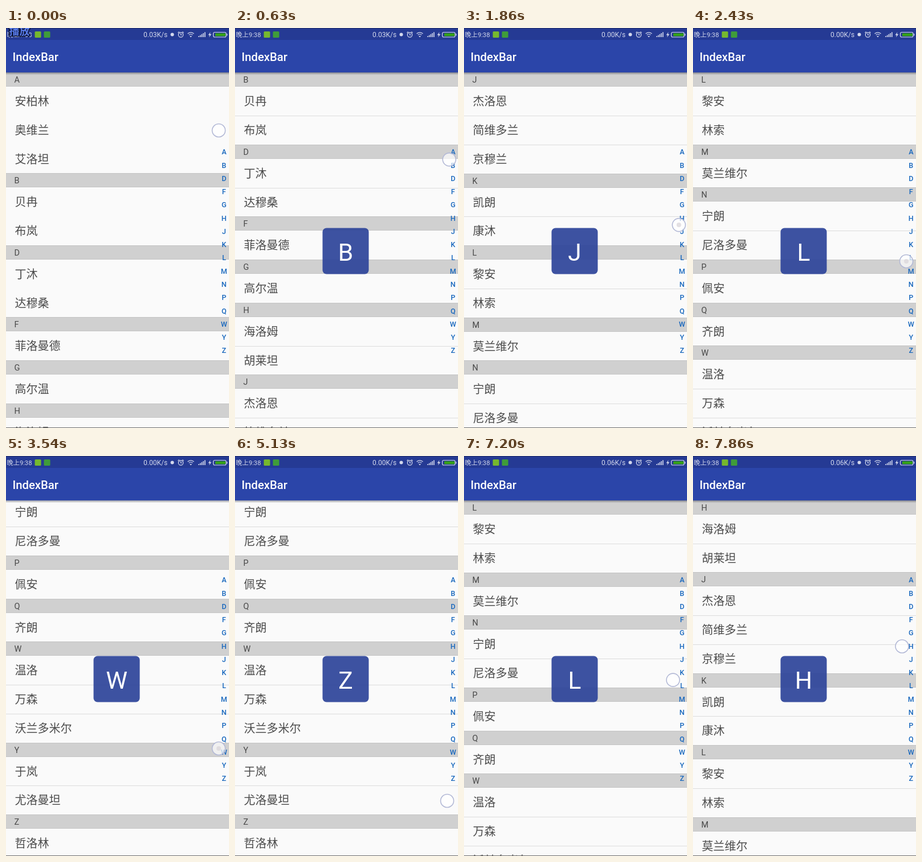
An HTML page for the animation above (8 s loop, 391x703 px).

```html
<!DOCTYPE html>
<html lang="zh-CN">
<head>
<meta charset="utf-8">
<title>IndexBar</title>
<style>
  html, body { margin: 0; width: 100%; height: 100%; overflow: hidden; background: #fafafa; }
  svg { display: block; width: 391px; height: 703px; }
  text { font-family: Roboto, "Noto Sans CJK SC", "Noto Sans CJK", sans-serif; }
  .item { font-size: 20px; fill: #4b4b4b; }
  .head { font-size: 14.5px; fill: #484848; }
  .index { font-size: 12.5px; font-weight: 500; fill: #1767bd; text-anchor: middle; }
  .status { fill: #d3d8ec; }
  .line { fill: none; stroke: #d3d8ec; stroke-width: 1.2; }
  #hint { animation: hint 8s step-end infinite; }
  #rules { animation: rules 8s step-end infinite; }
  @keyframes hint { 0% { opacity: 1; } 1.5% { opacity: 0; } }
  @keyframes rules { 0% { opacity: 0; } 1.5% { opacity: 1; } }
</style>
</head>
<body>
<svg viewBox="0 0 391 703">
  <defs>
    <linearGradient id="shade" x2="0" y2="1">
      <stop offset="0" stop-color="#333a55" stop-opacity=".5"/>
      <stop offset="1" stop-color="#555" stop-opacity=".08"/>
    </linearGradient>
  </defs>
  <rect width="391" height="703" fill="#fafafa"/>
  <g id="list"><g id="rows"></g><g id="rules"></g></g>
  <rect y="702" width="391" height="1" fill="#6b6b6b"/>
  <g id="bar"></g>

  <g id="popup">
    <rect x="153.5" y="351.5" width="81" height="81" rx="7" fill="#2f459a" fill-opacity=".93"/>
    <text id="letter" x="194" y="409" font-size="42.5" fill="#fff" text-anchor="middle"></text>
  </g>
  <g id="finger">
    <circle r="11.5" fill="#fff" fill-opacity=".68" stroke="#b3b9d6" stroke-width="1.6"/>
    <circle id="dot" r="4" fill="#dcd8dc"/>
  </g>

  <rect y="78" width="391" height="4" fill="url(#shade)"/>
  <rect width="391" height="78" fill="#2b45a9"/>
  <rect width="391" height="21" fill="#253a94"/>
  <rect width="391" height="1" fill="#1c2a68"/>
  <text x="11.5" y="58" font-size="20.3" font-weight="500" fill="#fff">IndexBar</text>

  <text class="status" x="1.5" y="15.5" font-size="11.2">晚上9:38</text>
  <rect x="50.5" y="6" width="11" height="11" rx="1.5" fill="#76b82e"/>
  <rect x="66.5" y="6" width="11" height="11" rx="1.5" fill="#3f9c3a"/>
  <text class="status" id="speed" x="241" y="16" font-size="12"></text>
  <circle class="status" cx="291.5" cy="11.5" r="3"/>
  <g class="line">
    <circle cx="306.5" cy="12" r="4.2"/>
    <path d="M306.5 9.5v2.7h2M301.5 8.5l2.2-2M311.5 8.5l-2.2-2"/>
    <path d="M318.5 10q5.5-4.4 11 0M320.7 12.3q3.3-2.6 6.6 0"/>
    <path d="M338 16v-2M340.7 16v-3.6M343.4 16v-5.2M346.1 16v-7M348.8 16v-8.8" stroke-width="1.6"/>
    <rect x="363.5" y="7.5" width="22.5" height="8.5" rx="2.5"/>
    <path d="M387.7 10v3.5"/>
  </g>
  <path class="status" d="M322 14h4l-2 2.4zM358.5 7l-4 5.5h2.6l-1.2 4 4.4-5.8h-2.8z"/>
  <rect x="367" y="9.3" width="18" height="5" fill="#35a116"/>
  <g id="hint">
    <text x="5.5" y="12" font-size="18" font-weight="700" fill="#587be8" stroke="#0c1436" stroke-width="3" paint-order="stroke">播放</text>
  </g>
</svg>
<script>
const groups = {
  A: "安柏林 奥维兰 艾洛坦", B: "贝冉 布岚", D: "丁沐 达穆桑", F: "菲洛曼德",
  G: "高尔温", H: "海洛姆 胡莱坦", J: "杰洛恩 简维多兰 京穆兰", K: "凯朗 康沐",
  L: "黎安 林索", M: "莫兰维尔", N: "宁朗 尼洛多曼", P: "佩安", Q: "齐朗",
  W: "温洛 万森 沃兰多米尔", Y: "于岚 尤洛曼坦", Z: "哲洛林"
};
const letters = Object.keys(groups);
const LOOP = 8000, TOP = 78, HEAD = 25, ROW = 50.75;
const INDEX_Y = 218, INDEX_STEP = 23.27;

// time, x, y, number of steps on the way to the next stop
const path = [
  [0, 373, 180, 9], [1170, 379, 295, 9], [2430, 374, 410, 8], [3540, 373, 514, 6],
  [4350, 372, 609, 2], [4590, 372, 637, 1], [4725, 372, 637, 3], [5130, 372, 606, 11],
  [6630, 366.5, 441, 9], [7860, 366.5, 334.5, 1], [LOOP, 366.5, 334.5, 1]
];

const $ = id => document.getElementById(id);

function add(parent, tag, attrs, text) {
  const el = document.createElementNS("http://www.w3.org/2000/svg", tag);
  for (const k in attrs) el.setAttribute(k, attrs[k]);
  if (text) el.textContent = text;
  $(parent).append(el);
}

function band(y, height, fill, parent = "rows") {
  add(parent, "rect", { y: Math.round(y), width: 391, height, fill });
}

const tops = {};
let y = TOP;
for (const key of letters) {
  tops[key] = y - TOP;
  band(y, HEAD, "#d0d0d0");
  band(y, 1, "#c3c3c3");
  band(y + HEAD - 1, 1, "#c5c5c5");
  add("rows", "text", { class: "head", x: 14.5, y: Math.round(y) + 18 }, key);
  y += HEAD;
  groups[key].split(" ").forEach((name, i) => {
    if (i) band(y, 1, "#dcdcdc", "rules");
    add("rows", "text", { class: "item", x: 15.5, y: Math.round(y) + 33 }, name);
    y += ROW;
  });
}
const maxScroll = tops.N + 29.5;

letters.forEach((key, i) =>
  add("bar", "text", { class: "index", x: 382.3, y: INDEX_Y + i * INDEX_STEP + 4.3 }, key));

function fingerAt(t) {
  const i = path.findIndex((p, k) => t < path[k + 1][0]);
  const [t0, x0, y0, n] = path[i], [t1, x1, y1] = path[i + 1];
  const f = Math.floor((t - t0) / (t1 - t0) * n + 1e-6) / n;
  return [x0 + (x1 - x0) * f, y0 + (y1 - y0) * f];
}

function draw(now) {
  const t = now % LOOP;
  const [fx, fy] = fingerAt(t);
  const i = Math.min(letters.length - 1, Math.round((fy - INDEX_Y) / INDEX_STEP));
  const key = letters[Math.max(0, i)];
  const scroll = Math.round(Math.min(tops[key], maxScroll));

  $("list").setAttribute("transform", `translate(0 ${-scroll})`);
  $("finger").setAttribute("transform", `translate(${fx} ${fy})`);
  $("popup").setAttribute("visibility", i < 0 ? "hidden" : "visible");
  $("letter").textContent = key;
  $("dot").setAttribute("opacity", t > 1800 && t < 4350 ? 0.8 : 0);
  $("speed").textContent = (t < 1720 ? "0.03" : t < 6240 ? "0.00" : "0.06") + "K/s";
}

const animations = document.getAnimations();
const start = performance.now();
function tick() {
  const now = performance.now() - start;
  animations.forEach(a => a.currentTime = now);
  draw(now);
  requestAnimationFrame(tick);
}
tick();
</script>
</body>
</html>
```
